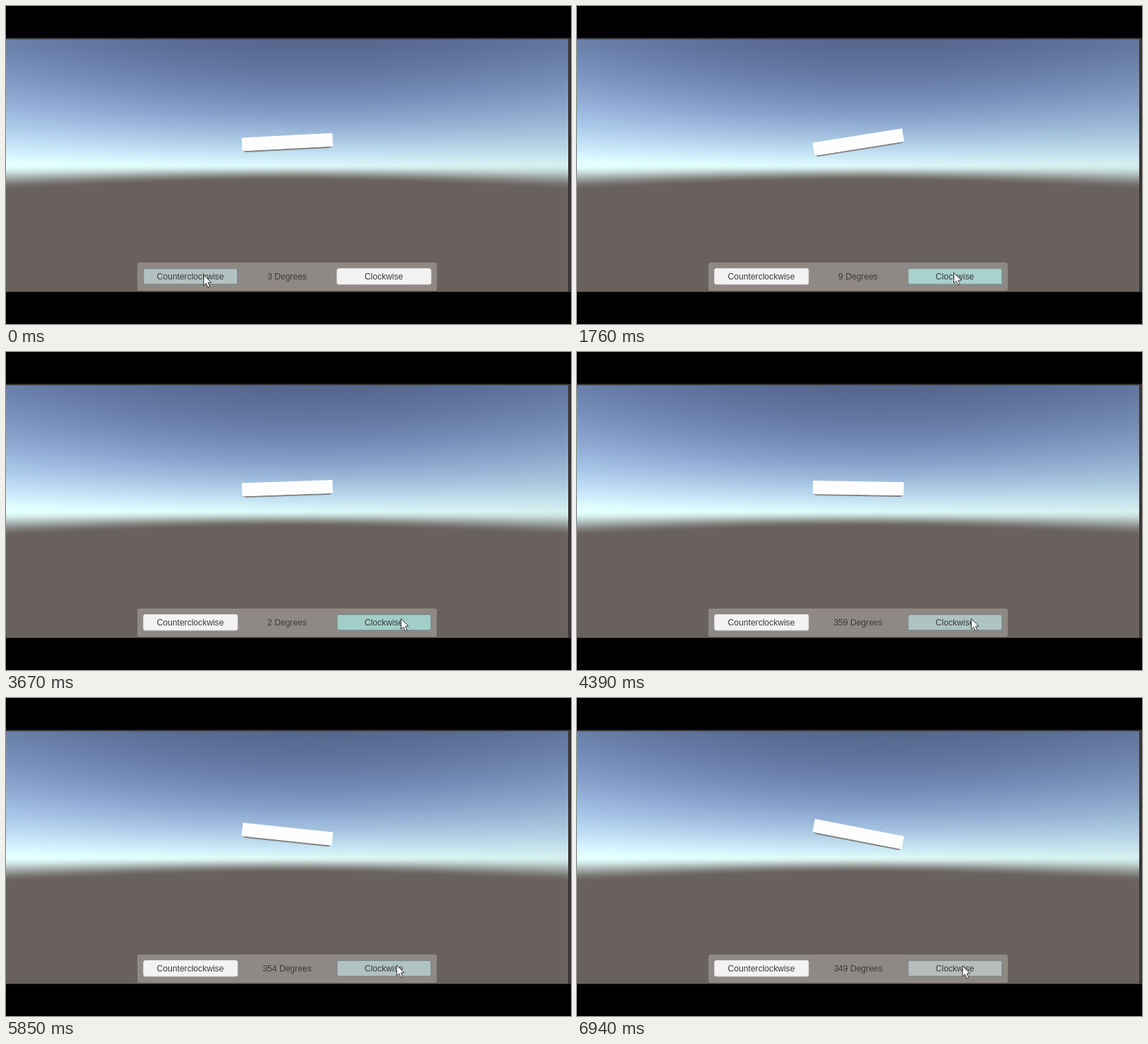
An HTML page with a canvas that plays this animation: 800 px wide and 450 px high, repeating every 6.97 s.

```html
<!DOCTYPE html>
<html lang="en">
<head>
<meta charset="utf-8">
<title>Rotation control</title>
<style>
html, body { margin: 0; width: 100%; height: 100%; overflow: hidden; background: #000; }
canvas { display: block; width: 800px; height: 450px; }
</style>
</head>
<body>
<canvas id="stage" width="800" height="450"></canvas>
<script>
const LOOP = 6970, FADE = 100, PRESS = 110;
const LEAVE = 1505, ENTER = 1670;
const EYE = { x: 398, y: 225 };
const WHITE = [243, 243, 244], GRAY = [185, 187, 188], TEAL = [162, 206, 202];
const GROUND = [104, 97, 93];

// Steady clicking, one degree per click: first up, then down.
const UP = { start: -25, gap: 211, count: 6, from: 3, step: 1 };
const DOWN = { start: 2010, gap: 259.3, count: 19, from: 8, step: -1 };

const ctx = document.getElementById('stage').getContext('2d');
const clamp = v => Math.max(0, Math.min(1, v));
const lerp = (a, b, k) => a + (b - a) * k;
const mix = (a, b, k) => a.map((v, i) => lerp(v, b[i], k));
const rgb = c => `rgb(${c.map(Math.round)})`;
const smooth = v => { const k = clamp(v); return k * k * (3 - 2 * k); };

// Each channel fades from the haze at eye level to the zenith.
const fadeUp = (zenith, haze, depth, power) => height =>
  lerp(zenith, haze, Math.exp(-((height / depth) ** power)));
const channels = [
  fadeUp(70, 224, 82, 1.05), fadeUp(82, 252, 92, 1.1), fadeUp(115, 252, 125, 1.4)
];

function viewColor(x, y) {
  const drop = y - EYE.y, side = x - EYE.x;
  const height = Math.max(0, -drop) / Math.hypot(1, side / 400);
  const depth = drop / Math.hypot(1, side / 310);
  const light = 1.03 - .08 * x / 800;
  return mix(channels.map(f => f(height) * light), GROUND, smooth((depth + 1) / 23));
}

function makeScene() {
  const scene = document.createElement('canvas');
  scene.width = 800;
  scene.height = 450;
  const c = scene.getContext('2d');
  const top = 47, w = 796, h = 357;
  const img = c.createImageData(w, h);
  for (let y = 0; y < h; y++)
    for (let x = 0; x < w; x++)
      img.data.set([...viewColor(x, y + top), 255], (y * w + x) * 4);
  c.fillStyle = '#000';
  c.fillRect(0, 0, 800, 450);
  c.fillStyle = '#3a3536';
  c.fillRect(0, 45, 800, 360);
  c.putImageData(img, 0, top);
  return scene;
}
const scene = makeScene();

function box(x, y, w, h, r, fill, edge) {
  ctx.beginPath();
  ctx.roundRect(x, y, w, h, r);
  ctx.fillStyle = fill;
  ctx.fill();
  if (edge) {
    ctx.strokeStyle = edge;
    ctx.lineWidth = 1;
    ctx.stroke();
  }
}

function label(text, x) {
  ctx.font = '12.1px "Liberation Sans", Arial, sans-serif';
  ctx.textAlign = 'center';
  ctx.fillStyle = '#3c3b3b';
  ctx.fillText(text, x, 387);
}

function button(text, x, hover, glow) {
  const fill = mix(WHITE, mix(GRAY, TEAL, glow), hover);
  const edge = mix([232, 232, 232], [116, 130, 129], hover);
  box(x + .8, 371.6, 133, 22.2, 2.5, rgb(fill), rgb(edge));
  label(text, x + 67);
}

function polygon(points, fill) {
  ctx.beginPath();
  points.forEach(p => ctx.lineTo(...p));
  ctx.closePath();
  ctx.fillStyle = fill;
  ctx.fill();
}

function bar(angle) {
  const a = -angle * Math.PI / 180, cos = Math.cos(a), sin = Math.sin(a);
  const front = [[-64.3, -9.5], [64.3, -9.5], [64.3, 9.3], [-64.3, 9.3]]
    .map(([x, y]) => [398.3 + x * cos - y * sin, 192.7 + x * sin + y * cos]);
  const back = front.map(([x, y]) => [lerp(EYE.x, x, .91), lerp(EYE.y, y, .91)]);
  polygon([front[3], front[2], back[2], back[3]], '#858380');
  polygon(front, '#fdfdfd');
}

function cursor(t) {
  const travel = smooth((t - 1380) / 470);
  const drift = clamp((t - 1850) / 5090) ** 3;
  ctx.save();
  ctx.translate(lerp(280, 560, travel) - 14 * drift, lerp(380.5, 377, travel) + 2 * drift);
  ctx.lineJoin = 'round';
  ctx.lineWidth = 1;
  ctx.strokeStyle = '#333';
  polygon([[0, 0], [0, 15], [3.4, 11.9], [6, 17.6], [8.5, 16.5], [6, 11], [10.5, 10.8]], '#fff');
  ctx.stroke();
  ctx.restore();
}

function clickState(t) {
  const run = t < DOWN.start ? UP : DOWN;
  const n = Math.min(run.count, Math.floor((t - run.start) / run.gap));
  const since = t - run.start - n * run.gap;
  const until = n < run.count ? run.gap - since : Infinity;
  return {
    angle: run.from + n * run.step,
    glow: clamp(Math.min(since / FADE, 1 - (PRESS - until) / FADE))
  };
}

function draw(t) {
  const { angle, glow } = clickState(t);
  ctx.drawImage(scene, 0, 0);
  bar(angle);
  box(186, 363, 424, 40, 3, '#8f8985');
  button('Counterclockwise', 194, 1 - clamp((t - LEAVE) / FADE), glow);
  button('Clockwise', 468, clamp((t - ENTER) / FADE), glow);
  label((angle + 360) % 360 + ' Degrees', 398);
  cursor(t);
}

const start = performance.now();
function frame() {
  draw((performance.now() - start) % LOOP);
  requestAnimationFrame(frame);
}
frame();
</script>
</body>
</html>
```
